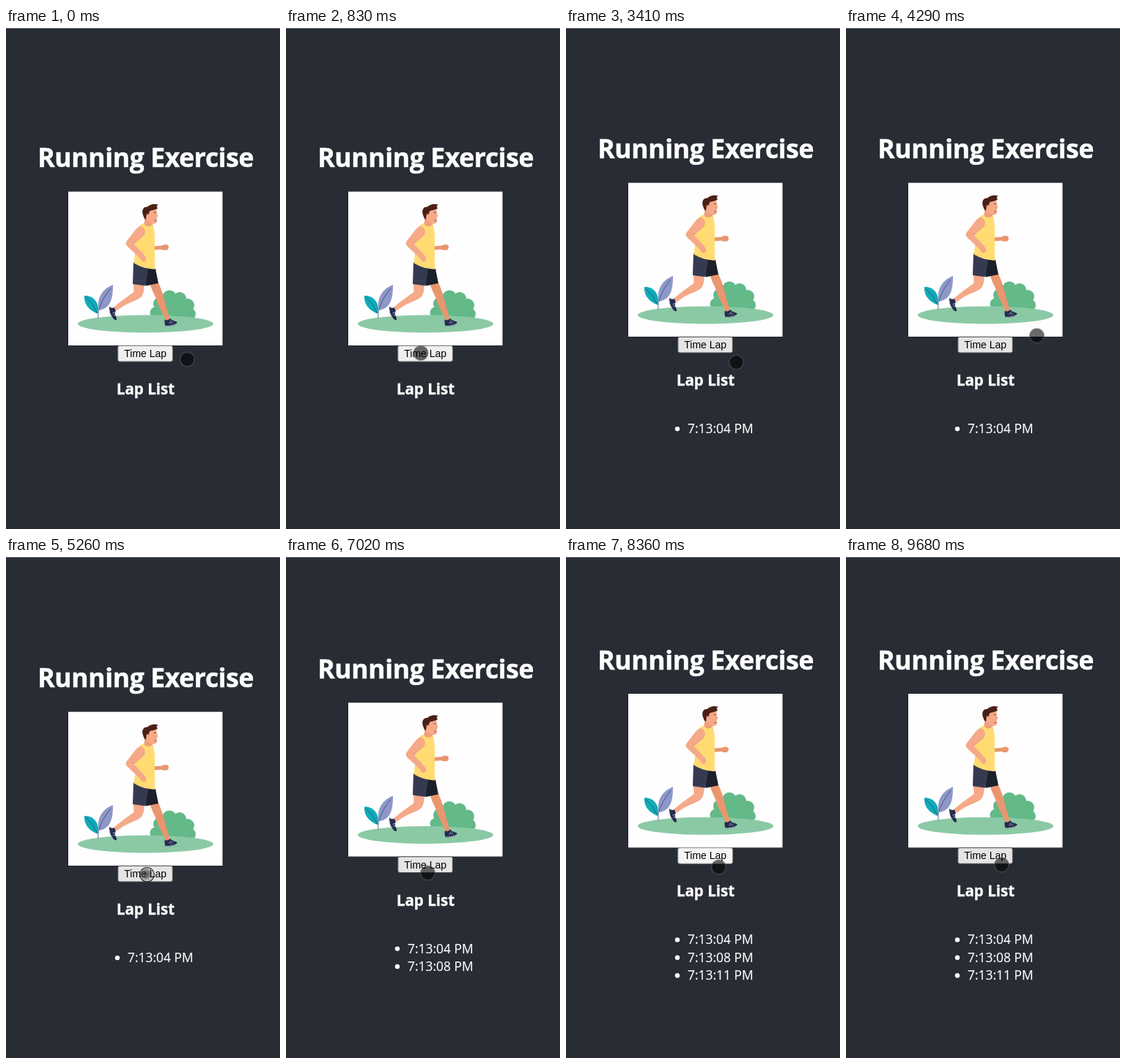
These frames come from a looping animation (374x685 px, 9700 ms). An HTML page:

```html
<!DOCTYPE html>
<html lang="en">
<head>
<meta charset="utf-8">
<title>Running Exercise</title>
<style>
  html, body { margin: 0; width: 100%; height: 100%; overflow: hidden; background: #282c34; }
  svg { display: block; width: 374px; height: 685px; }
  text { font-family: "Open Sans", "Noto Sans", sans-serif; fill: #fff; }
  .title { font-size: 35.5px; font-weight: 700; letter-spacing: -.35px; stroke: #fff; stroke-width: .5px; }
  .sub { font-size: 20.5px; font-weight: 700; stroke: #fff; stroke-width: .35px; }
  .lap { font-size: 17.4px; stroke: #fff; stroke-width: .15px; }
  .label { font: 14px "Liberation Sans", Arial, sans-serif; fill: #000; }
  .mid { text-anchor: middle; }
</style>
</head>
<body>
<svg viewBox="0 0 374 685">
  <defs>
    <radialGradient id="press" cx=".42" cy=".47" r=".5">
      <stop offset="0" stop-color="#222" stop-opacity=".75"/>
      <stop offset=".5" stop-color="#333" stop-opacity=".6"/>
      <stop offset="1" stop-color="#444" stop-opacity=".12"/>
    </radialGradient>
  </defs>
  <rect width="374" height="685" fill="#282c34"/>
  <rect width="374" height="1" fill="#65686d"/>

  <g id="page">
    <text class="title mid" x="190.7" y="190.3">Running Exercise</text>

    <rect x="85" y="223.700" width="210.500" height="210.300" fill="#fefefe"/>
    <g id="bush" fill="#63b987">
      <circle cx="223" cy="368" r="9.5"/>
      <circle cx="237" cy="370" r="9"/>
      <circle cx="248" cy="379" r="9"/>
      <circle cx="251" cy="391" r="8"/>
      <circle cx="210" cy="377" r="9"/>
      <circle cx="204" cy="389" r="7.500"/>
      <path d="M199 398V387L212 368H242L256 385V398Z"/>
    </g>
    <ellipse cx="190.5" cy="404.5" rx="92.5" ry="12" fill="#8bc9a5"/>

    <path d="M107 366C118 365 128 374 126 391C114 387 106 378 107 366Z" fill="#0fabb9"/>
    <path d="M146 351C146 372 142 383 127 386C123 372 130 357 146 351Z" fill="#8d98c8"/>
    <path d="M109 368Q119 377 125 390M143 356Q131 370 126.500 386" fill="none" stroke="#334a6c" stroke-width=".8"/>
    <path d="M126.500 384Q125.500 391 125.800 398" fill="none" stroke="#8f9fb5" stroke-width="1.500"/>

    <g id="runner">
      <path d="M200 301L215 300" stroke="#e9966f" stroke-width="5"/>
      <path d="M212 298Q217 294.500 221.500 297.500Q223 301 220 303.500Q215 304.500 212 302.500Z" fill="#e9966f"/>

      <path d="M196.500 350L208 348C212 358 216 367 217.500 377L224 399L218 400.500C215 391 209 383 206.500 375C204.500 367 200 361 196.500 350Z" fill="#e9966f"/>
      <path d="M217 398.500Q221 401 224 397C227 401 233 400.500 234 403C233 405.500 228 408 218 408Q215.500 403 217 398.500Z" fill="#252c4c"/>
      <path d="M218 407.500Q229 407.300 234 403.500M222.500 404L225.500 400M225.500 404.300L228 401.500" fill="none" stroke="#cdd2e4" stroke-width=".8"/>

      <path d="M174 349L188.500 352C188.500 361 187 366 183 369C176 374 166 375 151 386.500L147.500 381.500C156 374 166 367 174.500 361Z" fill="#f5a988"/>
      <path d="M141 381Q144.500 384 147.500 382Q151 386 149 389C148 393 152 396 151 399Q147.500 400 145 396Q140 389 141 381Z" fill="#252c4c"/>
      <path d="M140.500 382Q140.500 390 146 398M145.500 390L149 388.500M146.500 393L149 391.800" fill="none" stroke="#cdd2e4" stroke-width=".8"/>

      <path d="M188 328L204 329L208 349L191 352.500Z" fill="#1c1f2c"/>
      <path d="M174 320Q184 327 194 329L190.500 352.500L173 350Z" fill="#353a50"/>

      <path d="M190 258L199.500 264L200.500 271Q195 276 188 270Z" fill="#ee9f7b"/>
      <path d="M187 267Q194 274.500 200.500 268.500L203 281V330Q187 329 174.500 321.500L176.500 305L175.500 284Q179 271 187 267Z" fill="#ffdb72"/>

      <path d="M190 248L205 246.500L206 253L207.500 257.500L206 259L205.500 266Q203 269 197 267L190 262Z" fill="#f5a988"/>
      <path d="M187.500 257C184.500 250 187 244 193 244.500C197 240.500 203 240 207.500 241.500L205.500 244L207 246.500C203 249.500 198 248.500 196 250.500L194.500 255L192 254L191 262Q188.500 261 187.500 257Z" fill="#4a2016"/>
      <path d="M201.500 252.300H205M202.500 263Q204 264 205.500 263" fill="none" stroke="#733524" stroke-width=".8"/>

      <path d="M184 271C190 272 191.500 280 188 284L175 295.500C180 301 185 306 190 312C193 316 191 320 187 319.500C184 318.500 183 314.500 180 312L165 298Q162 294 165 291L175 278Q180 271 184 271Z" fill="#f5a988"/>
      <path d="M172 292.500L176 294.500" stroke="#e9966f"/>
    </g>

    <rect id="button" x="152.800" y="434.300" width="74.600" height="21.700" rx="2.500"/>
    <text class="label mid" x="190.200" y="450">Time Lap</text>
    <text class="sub mid" x="190.500" y="501">Lap List</text>
    <g id="list"></g>
  </g>

  <circle id="cursor" r="9.800"/>
</svg>

<script>
const LOOP = 9700;
const $ = id => document.getElementById(id);

const laps = [
  { at: 1290, time: '7:13:04 PM' },
  { at: 5490, time: '7:13:08 PM' },
  { at: 8240, time: '7:13:11 PM' }
];
const shifts = [0, -12, -24.5, -36.7];

// Pointer moves: first and last step time, step count, then bend and end points
const moves = [
  { from: 130, to: 830, n: 7, via: [215, 455], end: [184, 444.5] },
  { from: 1290, to: 1290, n: 1, via: [184, 446], end: [184.5, 447] },
  { from: 2460, to: 3410, n: 9, via: [208, 456], end: [232.5, 457] },
  { from: 3540, to: 4490, n: 10, via: [295, 440], end: [245, 409] },
  { from: 4620, to: 5060, n: 5, via: [202, 420], end: [192.5, 432.5] },
  { from: 5260, to: 5260, n: 1, via: [192.5, 434], end: [192.5, 434.3] },
  { from: 5490, to: 5490, n: 1, via: [193, 433], end: [193.5, 432] },
  { from: 7130, to: 7900, n: 8, via: [327, 414], end: [208.5, 424] },
  { from: 9250, to: 9450, n: 3, via: [209, 422], end: [210, 421] },
  { from: 9680, to: 9680, n: 1, via: [211, 421], end: [212.5, 421] }
];
const presses = [[1180, 1290], [5260, 5490], [8130, 8240]];

const buttonLooks = {
  idle: { fill: '#efefef', stroke: '#767676' },
  hover: { fill: '#e5e5e5', stroke: '#4f4f4f' },
  active: { fill: '#f5f5f5', stroke: '#8d8d8d' }
};

const within = (t, [a, b]) => t >= a && t < b;
const bend = (a, b, c, p) => (1 - p) ** 2 * a + 2 * p * (1 - p) * b + p * p * c;
const set = (el, attrs) => {
  for (const name in attrs) el.setAttribute(name, attrs[name]);
};

$('list').innerHTML = laps.map((lap, i) => {
  const y = 566.1 + i * 24.4;
  return `<g><circle cx="152" cy="${y - 6}" r="3.2" fill="#fff"/>` +
    `<text class="lap" x="166" y="${y}">${lap.time}</text></g>`;
}).join('');
const rows = [...$('list').children];

function pointer(t) {
  let pos = [247.5, 453];
  for (const { from, to, n, via, end } of moves) {
    if (t < from) break;
    const gap = n > 1 ? (to - from) / (n - 1) : 1;
    const p = Math.min(n, Math.floor((t - from) / gap + 1e-6) + 1) / n;
    pos = pos.map((v, i) => bend(v, via[i], end[i], p));
  }
  return pos;
}

function buttonState(t) {
  if (t < 1180) return 'idle';
  return within(t, [8240, 8600]) ? 'active' : 'hover';
}

function draw(t) {
  const count = laps.filter(lap => t >= lap.at).length;
  set($('page'), { transform: `translate(0 ${shifts[count]})` });
  rows.forEach((row, i) => set(row, { visibility: i < count ? 'visible' : 'hidden' }));
  set($('button'), buttonLooks[buttonState(t)]);

  const [cx, cy] = pointer(t);
  const down = presses.some(span => within(t, span));
  set($('cursor'), {
    cx, cy,
    fill: down ? 'url(#press)' : 'rgba(0,0,0,.58)',
    stroke: down ? '#1d1f23' : 'rgba(90,92,98,.5)',
    'stroke-width': down ? 1.2 : 1.6
  });
}

const start = performance.now();
function tick() {
  draw((performance.now() - start) % LOOP);
  requestAnimationFrame(tick);
}
tick();
</script>
</body>
</html>
```
